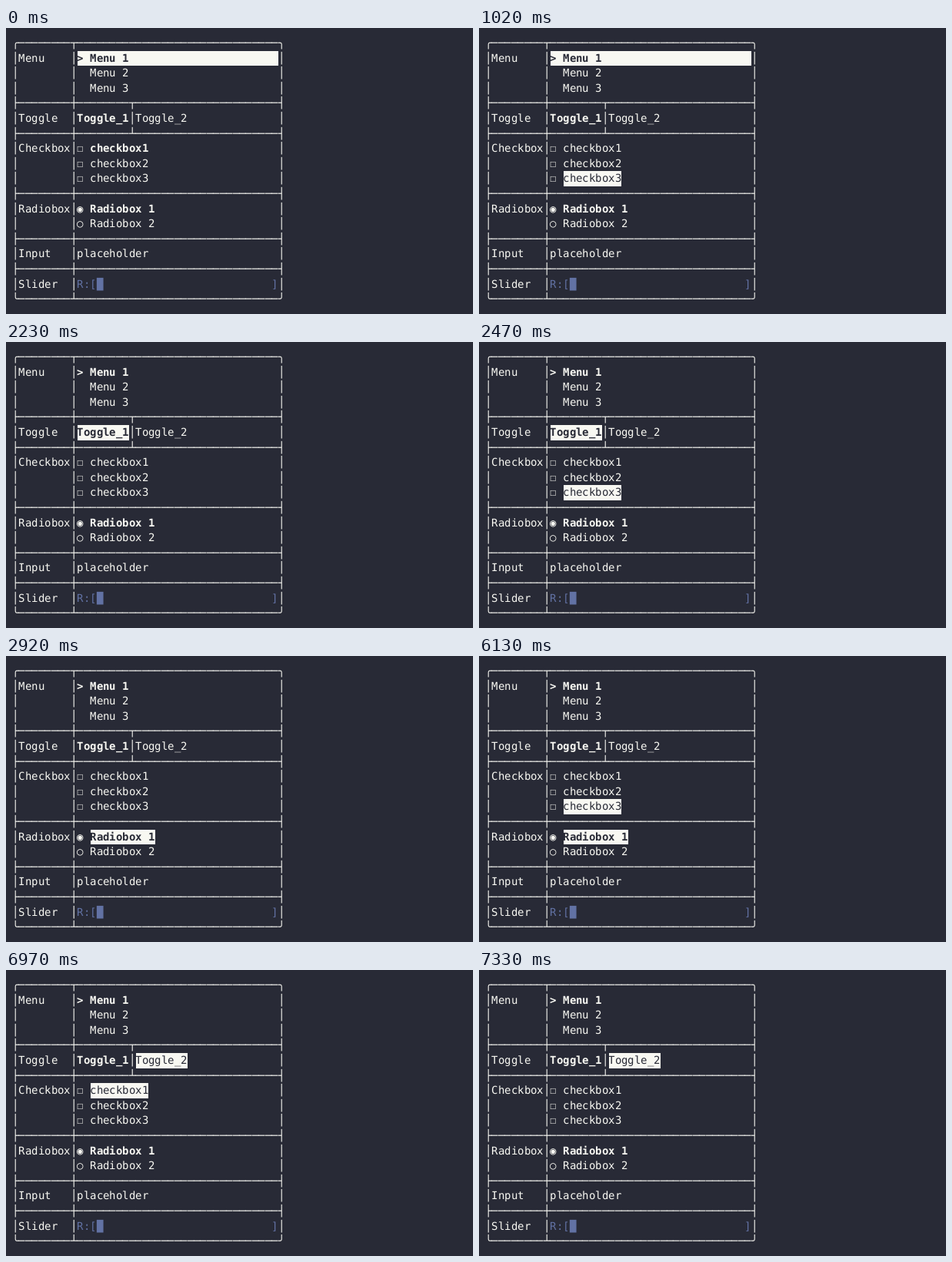
An HTML page that plays this animation: 607x372 px, repeating every 8 s.

```html
<!DOCTYPE html>
<html lang="en">
<head>
<meta charset="utf-8">
<title>Terminal form</title>
<style>
  html, body { margin: 0; width: 100%; height: 100%; overflow: hidden; background: #282a36; }
  svg { display: block; }
  text {
    font: 14px 'DejaVu Sans Mono', monospace;
    fill: #f8f8f2;
    white-space: pre;
    text-rendering: geometricPrecision;
  }
  rect { fill: #f8f8f2; }
  .bold { font-weight: bold; }
  .inverted { fill: #282a36; }
  .dim { fill: #6272a4; }
</style>
</head>
<body>
<svg id="screen" width="607" height="372"></svg>
<script>
const FONT_SIZE = 14, CELL_W = 8.43, CELL_H = 19.6, MARGIN_TOP = 10, LOOP = 8000;
const screen = document.getElementById('screen');

// Interactive labels: row, column, text, and optional width of the highlight.
const items = {
  menu1: { row: 1, col: 10, text: '> Menu 1', width: 31, chosen: true },
  menu2: { row: 2, col: 10, text: '  Menu 2', width: 31 },
  menu3: { row: 3, col: 10, text: '  Menu 3', width: 31 },
  toggle1: { row: 5, col: 10, text: 'Toggle_1', chosen: true },
  toggle2: { row: 5, col: 19, text: 'Toggle_2' },
  check1: { row: 7, col: 12, text: 'checkbox1' },
  check2: { row: 8, col: 12, text: 'checkbox2' },
  check3: { row: 9, col: 12, text: 'checkbox3' },
  radio1: { row: 11, col: 12, text: 'Radiobox 1', chosen: true },
  radio2: { row: 12, col: 12, text: 'Radiobox 2' },
};

// Time, focused item, hovered checkbox, active (bold) checkbox.
const timeline = [
  [0, 'menu1', '', 'check1'],
  [500, 'menu1', 'check1', 'check1'],
  [550, 'menu1', 'check1', 'check2'],
  [600, 'menu1', 'check1', 'check3'],
  [650, 'menu1', 'check1'],
  [710, 'menu1', 'check2'],
  [1020, 'menu1', 'check3'],
  [1070, 'radio1'],
  [1320, 'radio2'],
  [1470, 'radio1'],
  [1540, 'radio1', 'check3'],
  [1610, 'radio1', 'check1'],
  [1680, 'toggle1'],
  [1750, 'menu3'],
  [2230, 'toggle1'],
  [2300, 'toggle1', 'check1'],
  [2370, 'toggle1', 'check2'],
  [2440, 'toggle1', 'check3'],
  [2510, 'toggle1'],
  [2580, 'radio1'],
  [2670, 'radio2'],
  [2920, 'radio1'],
  [6130, 'radio1', 'check3'],
  [6170, 'radio1'],
  [6250, 'radio2'],
  [6430, 'radio1'],
  [6490, 'radio1', 'check3'],
  [6550, 'radio1', 'check1'],
  [6620, 'toggle2'],
  [6680, 'menu3'],
  [6720, 'menu2'],
  [6770, 'menu3'],
  [6830, 'toggle2'],
  [6970, 'toggle2', 'check1'],
  [7030, 'toggle2', 'check3'],
  [7250, 'toggle2', 'check2'],
  [7290, 'toggle2', 'check1'],
  [7330, 'toggle2'],
];

const cellX = col => (col + 1) * CELL_W;
const cellY = row => Math.round(MARGIN_TOP + row * CELL_H);

// Every glyph sits on a whole pixel, as in a bitmap terminal.
function label(row, col, text, style = '') {
  const xs = [...text].map((_, i) => Math.floor(cellX(col + i))).join(' ');
  const safe = text.replace('>', '&gt;');
  return `<text x="${xs}" y="${cellY(row) + FONT_SIZE}" class="${style}">${safe}</text>`;
}

function highlight(row, col, width) {
  const x = Math.round(cellX(col)), right = Math.round(cellX(col + width));
  const y = cellY(row), bottom = cellY(row + 1);
  return `<rect x="${x}" y="${y}" width="${right - x}" height="${bottom - y}"/>`;
}

function rule(row, start, joint, end, split = '─') {
  return label(row, 0, start + '─'.repeat(8) + joint + '─'.repeat(8) + split + '─'.repeat(22) + end);
}

function buildForm() {
  const rules = { 0: '╭┬╮', 4: '├┼┤┬', 6: '├┼┤┴', 10: '├┼┤', 13: '├┼┤', 15: '├┼┤', 17: '╰┴╯' };
  const titles = { 1: 'Menu', 5: 'Toggle', 7: 'Checkbox', 11: 'Radiobox', 14: 'Input', 16: 'Slider' };
  let out = '';
  for (let row = 0; row < 18; row++) {
    if (rules[row]) out += rule(row, ...rules[row]);
    else for (const col of [0, 9, 41]) out += label(row, col, '│');
    if (titles[row]) out += label(row, 1, titles[row]);
  }
  for (const row of [7, 8, 9]) out += label(row, 10, '☐');
  return out + label(5, 18, '│') + label(11, 10, '◉') + label(12, 10, '○')
    + label(14, 10, 'placeholder')
    + label(16, 10, 'R:[', 'dim') + label(16, 13, '█', 'dim') + label(16, 40, ']', 'dim');
}

function drawItem(name, [, focused, hovered, active]) {
  const { row, col, text, width = text.length, chosen } = items[name];
  const inverted = name === focused || name === hovered;
  const style = (chosen || name === active ? 'bold ' : '') + (inverted ? 'inverted' : '');
  return (inverted ? highlight(row, col, width) : '') + label(row, col, text, style);
}

const form = buildForm();
let shown;

function tick() {
  const time = performance.now() % LOOP;
  const state = timeline.findLast(([start]) => start <= time);
  if (state !== shown) {
    shown = state;
    screen.innerHTML = form + Object.keys(items).map(name => drawItem(name, state)).join('');
  }
  requestAnimationFrame(tick);
}
tick();
</script>
</body>
</html>
```
